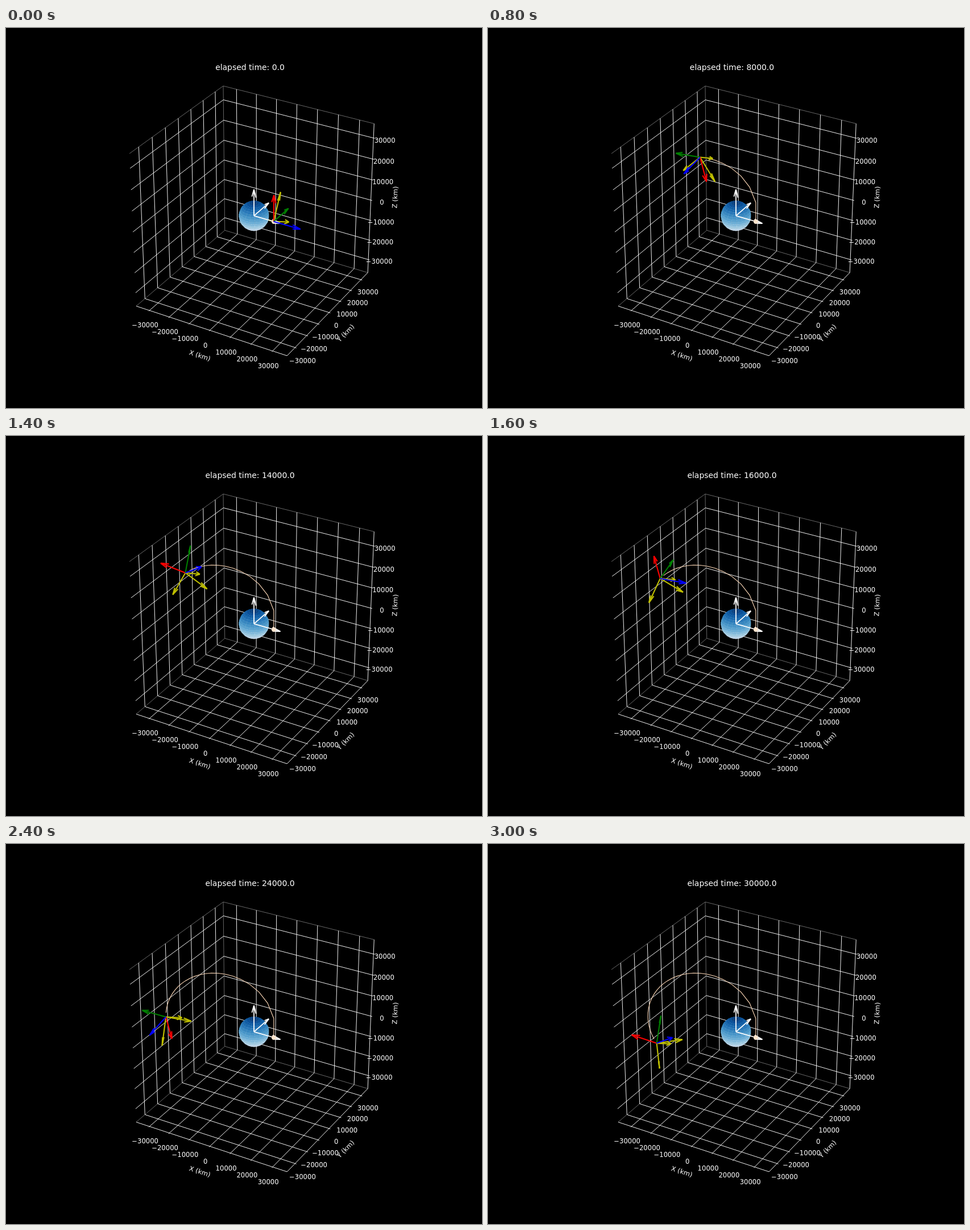
Animation, 837 px wide and 669 px high, one loop 3.1 s. Source, as an HTML page with a canvas:

```html
<!DOCTYPE html>
<html>
<head>
<meta charset="utf-8">
<style>
  html, body { margin: 0; width: 100%; height: 100%; overflow: hidden; background: #000; }
  canvas { display: block; }
</style>
</head>
<body>
<canvas id="stage" width="837" height="669"></canvas>
<script>
const ctx = document.getElementById('stage').getContext('2d');
const RAD = Math.PI / 180;
const H = 36750;                    // half width of the plot box, km
const EARTH = 6378, ARROW = 2 * EARTH;
const MINOR = 0.8;                  // thin line width

// Vector helpers
const dot = (a, b) => a[0] * b[0] + a[1] * b[1] + a[2] * b[2];
const cross = (a, b) => [a[1] * b[2] - a[2] * b[1], a[2] * b[0] - a[0] * b[2], a[0] * b[1] - a[1] * b[0]];
const scale = (a, s) => a.map(c => c * s);
const add = (a, b, s = 1) => a.map((c, i) => c + b[i] * s);
const unit = a => scale(a, 1 / Math.hypot(...a));
function rotate(v, axis, deg) {
  const k = unit(axis), c = Math.cos(deg * RAD), s = Math.sin(deg * RAD);
  return add(add(scale(v, c), cross(k, v), s), k, dot(k, v) * (1 - c));
}

// Camera: azimuth -60, elevation 30
const RIGHT = [0.866, 0.5, 0], UP = [-0.25, 0.433, 0.866], TOWARD = [0.433, -0.75, 0.5];
const CUBE = [[1, 0, 0], [0, 1, 0], [0, 0, 1]];
function project(p) {
  const s = 153.1 / H / (1 - dot(p, TOWARD) / (18.18 * H));
  return [436 + s * dot(p, RIGHT), 330.6 - s * dot(p, UP)];
}

function line(points, color, width) {
  ctx.beginPath();
  points.forEach(p => ctx.lineTo(...project(p)));
  ctx.strokeStyle = color;
  ctx.lineWidth = width;
  ctx.stroke();
}

function arrow(from, dir, color, width) {
  const tip = add(from, dir, ARROW);
  const side = Math.hypot(dir[0], dir[1]) > 1e-6 ? [dir[1], -dir[0], 0] : [0, 1, 0];
  line([from, tip], color, width);
  for (const a of [15, -15]) line([tip, add(tip, rotate(dir, side, a), -0.3 * ARROW)], color, width);
}

function text(str, x, y, size, angle = 0) {
  ctx.save();
  ctx.translate(x, y);
  ctx.rotate(angle);
  ctx.font = size + 'px "DejaVu Sans", sans-serif';
  ctx.textAlign = 'center';
  ctx.fillStyle = '#fff';
  ctx.fillText(str, 0, size * 0.36);
  ctx.restore();
}

function axisName(str, x, y, a, b) {
  const p = project(a), q = project(b);
  text(str, x, y, 11.62, Math.atan2(q[1] - p[1], q[0] - p[0]));
}

function drawBox() {
  const h = H, out = H + 612, far = H * 1.0966;
  const gray = pts => line(pts, '#808080', MINOR);
  gray([[-h, -h, h], [-h, h, h], [-h, h, -h], [-h, -h, -h]]);
  gray([[-h, h, h], [h, h, h]]);
  gray([[-h, h, -h], [h, h, -h]]);
  for (let v = -30000; v <= 30000; v += 10000) {
    line([[v, -out, -h], [v, h, -h], [v, h, h]], '#fff', 0.93);
    line([[out, v, -h], [-h, v, -h], [-h, v, h]], '#fff', 0.93);
    line([[out, h, v], [-h, h, v], [-h, -h, v]], '#fff', 0.93);
    for (const p of [[v, -far, -far], [far, v, -far], [far, far, v]]) {
      const [x, y] = project(p);
      text(String(v).replace('-', '\u2212'), x, y + 6.3, 11.62);
    }
  }
  line([[-h, -h, -h], [h, -h, -h], [h, h, -h], [h, h, h]], '#fff', 0.93);
  axisName('X (km)', 341, 576.5, [-h, -h, -h], [h, -h, -h]);
  axisName('Y (km)', 597, 537, [h, -h, -h], [h, h, -h]);
  axisName('Z (km)', 684, 298, [h, h, -h], [h, h, h]);
}

const BLUES = [[247, 251, 255], [222, 235, 247], [198, 219, 239], [158, 202, 225], [107, 174, 214],
  [66, 146, 198], [33, 113, 181], [8, 81, 156], [8, 48, 107]];
function blue(f) {
  const i = Math.min(7, Math.floor(f * 8)), w = f * 8 - i;
  return `rgb(${BLUES[i].map((c, j) => Math.round(c + (BLUES[i + 1][j] - c) * w))})`;
}

function globeFaces() {
  const n = 19, faces = [];
  const at = (i, j) => {
    const u = 2 * Math.PI * i / n, v = Math.PI * j / n;
    return [Math.cos(u) * Math.sin(v), Math.sin(u) * Math.sin(v), Math.cos(v)].map(c => c * EARTH);
  };
  for (let i = 0; i < n; i++) for (let j = 0; j < n; j++) {
    const pts = [at(i, j), at(i + 1, j), at(i + 1, j + 1), at(i, j + 1)];
    const mid = scale(pts.reduce((a, b) => add(a, b)), 0.25);
    faces.push({ pts, depth: dot(mid, TOWARD), color: blue((n - 1 - j) / (n - 1)) });
  }
  return faces.sort((a, b) => a.depth - b.depth);
}
const GLOBE = globeFaces();

function drawGlobe() {
  for (const f of GLOBE) {
    ctx.beginPath();
    f.pts.forEach(p => ctx.lineTo(...project(p)));
    ctx.fillStyle = f.color;
    ctx.fill();
  }
}

// Twelve-hour elliptical orbit, perigee on +x
const A = 26610, ECC = 0.64, PERIOD = 43.08, FLAT = Math.sqrt(1 - ECC * ECC);
const INC = 63.4 * RAD;
const inPlane = (p, q) => [p, q * Math.cos(INC), q * Math.sin(INC)];
function orbit(ks) {
  const M = 2 * Math.PI * ks / PERIOD;
  let E = M + ECC * Math.sin(M);
  for (let i = 0; i < 12; i++) E -= (E - ECC * Math.sin(E) - M) / (1 - ECC * Math.cos(E));
  return {
    pos: inPlane(A * (Math.cos(E) - ECC), A * FLAT * Math.sin(E)),
    dir: unit(inPlane(-Math.sin(E), FLAT * Math.cos(E)))
  };
}

// Tumbling attitude: time (ks), angle, axis; a steady spin carries it between poses
const POSES = [
  [0, 0, [-0.7, 0.71, 0.06]], [4, 80.4, [-0.544, 0.836, 0.055]], [11, 233, [-0.744, 0.69, 0.073]],
  [16, 344, [-0.94, 0.22, -0.22]], [20, 78, [-0.62, 0.769, 0.132]], [24, 168, [-0.69, 0.72, 0.07]],
  [30, 300, [-0.786, 0.675, -0.02]]
];
const SPIN = 22, SPIN_AXIS = [-0.7, 0.71, 0.06];
function attitude(v, ks) {
  let i = 0;
  while (i < POSES.length - 2 && ks > POSES[i + 1][0]) i++;
  const [a, b] = [POSES[i], POSES[i + 1]];
  const w = (ks - a[0]) / (b[0] - a[0]);
  const carry = ([t, deg, axis]) => rotate(rotate(v, axis, deg), SPIN_AXIS, SPIN * (ks - t));
  return unit(add(scale(carry(a), 1 - w), carry(b), w));
}

function draw(ks) {
  ctx.fillStyle = '#000';
  ctx.fillRect(0, 0, 837, 669);
  drawBox();
  text('elapsed time: ' + (ks * 1000).toFixed(1), 429, 68.6, 13.94);

  const { pos, dir } = orbit(ks);
  const body = () => ['#00f', '#008000', '#f00'].map((color, i) => [color, attitude(CUBE[i], ks)])
    .reverse().forEach(([color, v]) => arrow(pos, v, color, 2.1));
  const inFront = dot(pos, TOWARD) > 0;

  const trail = Array.from({ length: ks }, (_, i) => orbit(i).pos);
  if (ks > 1) line(trail, '#ffdab9', 1.1);

  // Local orbital frame
  const nadir = scale(unit(pos), -1);
  const normal = cross(nadir, dir);
  for (const v of [nadir, add(normal, [0.08, 0, 0]), cross(normal, nadir)]) arrow(pos, v, '#bfbf00', 2.1);

  if (!inFront) body();
  drawGlobe();
  for (const v of CUBE) arrow([0, 0, 0], v, '#fff', 1.8);
  ctx.beginPath();
  ctx.arc(...project(orbit(0).pos), 3.8, 0, 7);
  ctx.fillStyle = '#ffe4cc';
  ctx.fill();
  if (inFront) body();
}

function tick() {
  draw(Math.floor(performance.now() / 100) % 31);
  requestAnimationFrame(tick);
}
tick();
</script>
</body>
</html>
```
